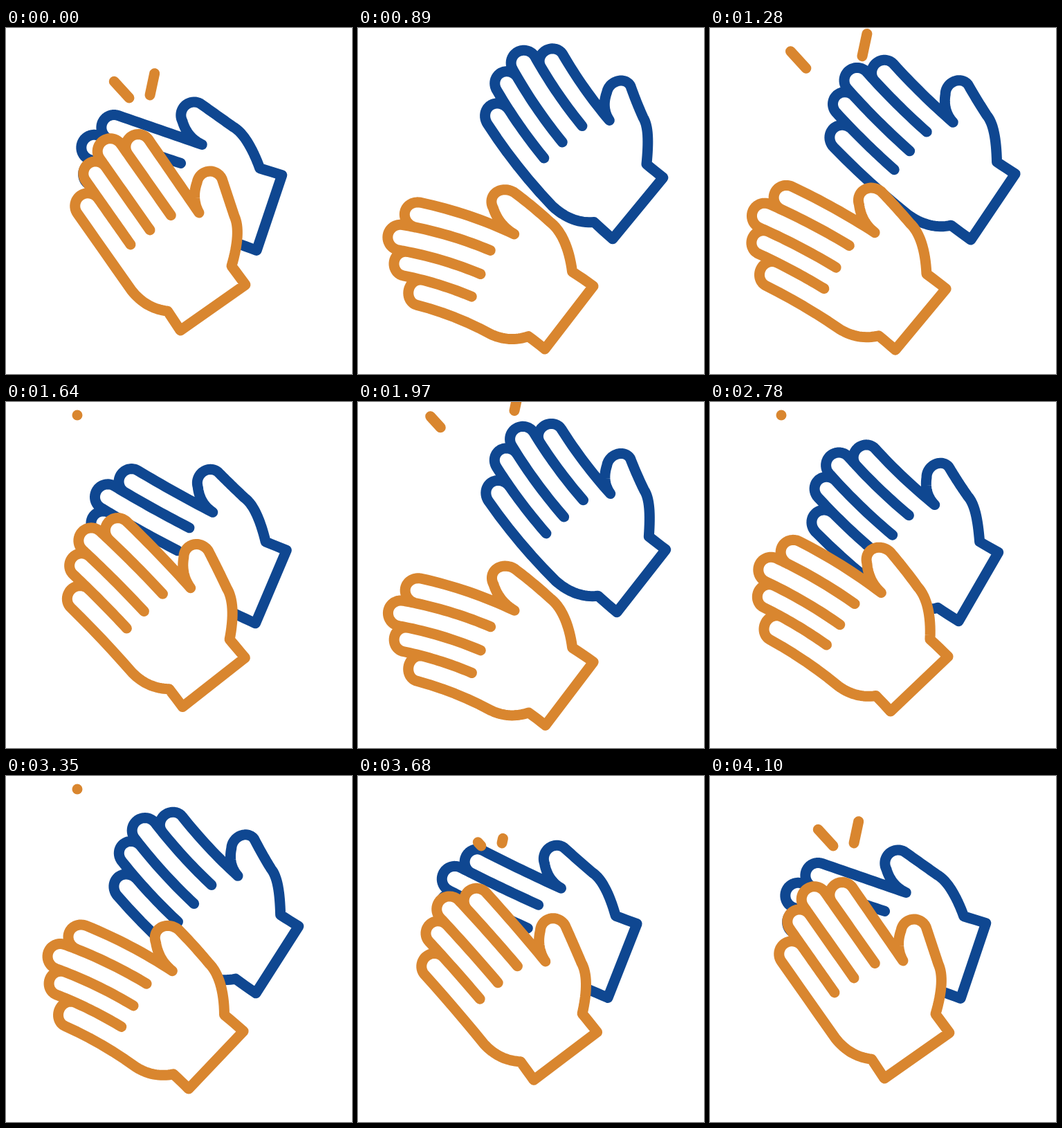
Recreate the animation shown at these times as an HTML page with a canvas. Size 500x500 px, loop 4130 ms.

```html
<!DOCTYPE html>
<html lang="en">
<head>
<meta charset="utf-8">
<title>Clapping hands</title>
<style>
  html, body { margin: 0; width: 100%; height: 100%; overflow: hidden; background: #fff; }
  canvas { display: block; width: 500px; height: 500px; }
</style>
</head>
<body>
<canvas id="stage" width="500" height="500"></canvas>
<script>
const ctx = document.getElementById('stage').getContext('2d');
const ORANGE = '#d9862f', BLUE = '#0f4791';
const LOOP = 4130, HOLD = 500, STEP = 30, CLAP = 20, LAST = 120, SLOW = 95;

// Hand in local space: wrist centre at the origin, fingers pointing up.
const outline = [];
const to = (x, y) => outline.push([x, y]);
function line(x, y, n = 16) {
  const [a, b] = outline[outline.length - 1];
  for (let i = 1; i <= n; i++) to(a + (x - a) * i / n, b + (y - b) * i / n);
}
function quad(cx, cy, x, y, n = 16) {
  const [a, b] = outline[outline.length - 1];
  for (let i = 1; i <= n; i++) {
    const t = i / n, s = 1 - t;
    to(s * s * a + 2 * s * t * cx + t * t * x, s * s * b + 2 * s * t * cy + t * t * y);
  }
}
function arc(cx, cy, r, from, end, n = 24) {
  for (let i = 0; i <= n; i++) {
    const a = (from + (end - from) * i / n) * Math.PI / 180;
    to(cx + r * Math.cos(a), cy + r * Math.sin(a));
  }
}
function fingertip(left, right, y) {
  line(left, y, 6);
  arc((left + right) / 2, y, (right - left) / 2, 180, 360);
}
to(-57.4, 0);
line(-56.5, -33.5, 4);
quad(-80, -54, -82, -88);
fingertip(-82, -45, -224);
fingertip(-45, -10, -256);
fingertip(-10, 27, -270);
fingertip(27, 63.5, -252);
line(62.4, -123.6);
quad(65, -147, 85.6, -161.4);
arc(99, -148, 19, 225, 370);
line(101.3, -90.2);
quad(97, -66, 56.5, -33.5);
line(57.4, 0, 4);

const grooves = [[-45, -143, -224], [-10, -144, -256], [27, -144, -252]].map(([x, a, b]) =>
  Array.from({ length: 17 }, (_, i) => [x, a + (b - a) * i / 16]));

// Poses through one clap: wrist angle, finger curvature (per 1000 px), wrist centre.
const phases = [0, 6, 9, 11, 13, 15, 16, 20];
const front = [
  [35.1, 0, 299, 404], [50.3, 1.03, 304.5, 421], [52.8, 1.74, 305.5, 421.5],
  [53.5, 1.86, 305.4, 420.8], [52.4, 1.8, 305, 418.5], [46.4, 1.52, 303.5, 410.5],
  [43.6, 1.37, 302.5, 407.5], [35.1, 0, 299, 404]
];
const back = [
  [71.4, 0, 380.5, 267], [56, -0.92, 409, 258.5], [52, -1.33, 409.5, 258.5],
  [50.3, -1.41, 408, 259.2], [50.6, -1.38, 404.5, 260.5], [57.4, -1.28, 392, 265.5],
  [59.9, -1.18, 388, 267], [71.4, 0, 380.5, 267]
];

function slope(keys, i, c) {
  if (i === 0 || i === keys.length - 1) return 0;
  const d0 = (keys[i][c] - keys[i - 1][c]) / (phases[i] - phases[i - 1]);
  const d1 = (keys[i + 1][c] - keys[i][c]) / (phases[i + 1] - phases[i]);
  return d0 * d1 <= 0 ? 0 : 2 * d0 * d1 / (d0 + d1);
}
function pose(keys, ph) {
  let i = 0;
  while (i < phases.length - 2 && ph >= phases[i + 1]) i++;
  const w = phases[i + 1] - phases[i], t = (ph - phases[i]) / w;
  const t2 = t * t, t3 = t2 * t;
  return keys[i].map((v, c) =>
    v * (2 * t3 - 3 * t2 + 1) + keys[i + 1][c] * (3 * t2 - 2 * t3) +
    w * (slope(keys, i, c) * (t3 - 2 * t2 + t) + slope(keys, i + 1, c) * (t3 - t2)));
}

function bend([x, y], k) {
  if (Math.abs(k) < 1e-6) return [x, y];
  const a = -y * k;
  return [x * Math.cos(a) - (1 - Math.cos(a)) / k, -(Math.sin(a) / k + x * Math.sin(a))];
}
function trace(points, k) {
  points.forEach((p, i) => {
    const [x, y] = bend(p, k);
    if (i) ctx.lineTo(x, y); else ctx.moveTo(x, y);
  });
}
function drawHand(keys, ph, color) {
  const [rot, curve, x, y] = pose(keys, ph), k = curve / 1000;
  ctx.save();
  ctx.translate(x, y);
  ctx.rotate(-rot * Math.PI / 180);
  ctx.strokeStyle = color;
  ctx.fillStyle = '#fff';
  ctx.beginPath();
  trace(outline, k);
  ctx.closePath();
  ctx.fill();
  grooves.forEach(g => trace(g, k));
  ctx.stroke();
  ctx.restore();
}

function drawSparks(ph, first) {
  let tail = Math.min(1, ph / 11.5);
  let head = 0.29 + 0.71 * (1 - Math.pow(1 - Math.min(1, ph / 10), 1.5));
  if (ph > 18) {
    tail = 0;
    head = 0.29 * (ph - 18) / 2;
  } else if (tail === 1 && first) return;
  ctx.strokeStyle = ORANGE;
  for (const [x, y, dx, dy] of [[178, 101, -75, -82], [208, 97, 23, -108]]) {
    ctx.beginPath();
    ctx.moveTo(x + dx * tail, y + dy * tail);
    ctx.lineTo(x + dx * head + 0.01, y + dy * head);
    ctx.stroke();
  }
}

function phaseAt(n) {
  if (n <= SLOW) return n % CLAP;
  const rest = (LAST - n) / (LAST - SLOW);
  return CLAP - 5 * rest * rest;
}

const start = performance.now();
function frame(now) {
  const t = Math.max(0, now - start) % LOOP;
  const n = Math.max(0, Math.floor((t - HOLD) / STEP));
  const ph = phaseAt(n);
  ctx.fillStyle = '#fff';
  ctx.fillRect(0, 0, 500, 500);
  ctx.lineWidth = 15;
  ctx.lineCap = ctx.lineJoin = 'round';
  drawHand(back, ph, BLUE);
  drawHand(front, ph, ORANGE);
  drawSparks(ph, n < CLAP);
  requestAnimationFrame(frame);
}
frame(start);
</script>
</body>
</html>
```
